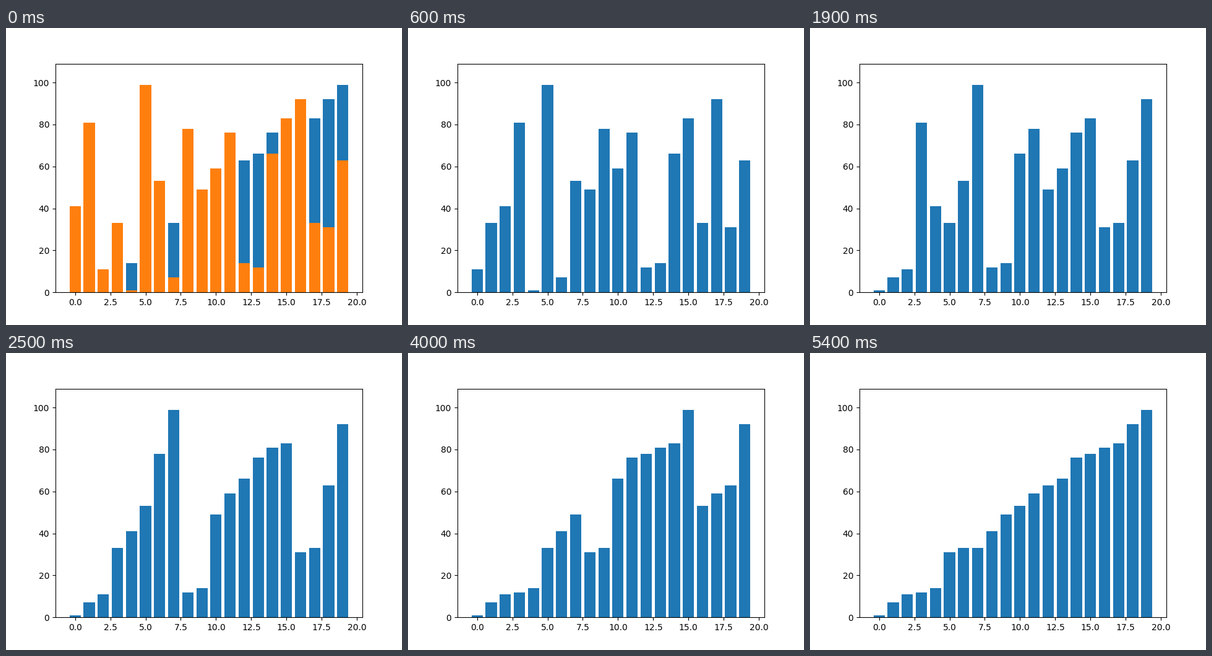
A matplotlib script for the animation above (5500 ms loop, 640 px wide and 480 px high).

```python
import matplotlib.pyplot as plt
from matplotlib.animation import FuncAnimation

VALUES = [41, 81, 11, 33, 1, 99, 53, 7, 78, 49,
          59, 76, 14, 12, 66, 83, 92, 33, 31, 63]


def comparators(n):
    """Index pairs of Batcher's odd-even merge sort, in order."""
    p = 1
    while p < n:
        k = p
        while k >= 1:
            for j in range(k % p, n - k, 2 * k):
                for a in range(j, min(j + k, n - k)):
                    b = a + k
                    if a // (2 * p) == b // (2 * p):
                        yield a, b
            k //= 2
        p *= 2


def sort_states(values):
    """The list before sorting and after every swap."""
    data = list(values)
    states = [data[:]]
    for a, b in comparators(len(data)):
        if data[a] > data[b]:
            data[a], data[b] = data[b], data[a]
            states.append(data[:])
    return states


states = sort_states(VALUES)
positions = range(len(VALUES))

fig, ax = plt.subplots(figsize=(6.4, 4.8), dpi=100)
bars = ax.bar(positions, states[-1], color="C0")
start_bars = ax.bar(positions, VALUES, color="C1")
ax.set_ylim(0, max(VALUES) + 10)


def update(i):
    # The first picture shows the unsorted bars over the sorted ones.
    heights = states[i] if i else states[-1]
    for bar, start_bar, height in zip(bars, start_bars, heights):
        bar.set_height(height)
        start_bar.set_visible(i == 0)
    return [*bars, *start_bars]


anim = FuncAnimation(fig, update, frames=len(states), interval=100,
                     repeat=True, repeat_delay=0, blit=False)

plt.show()
```
